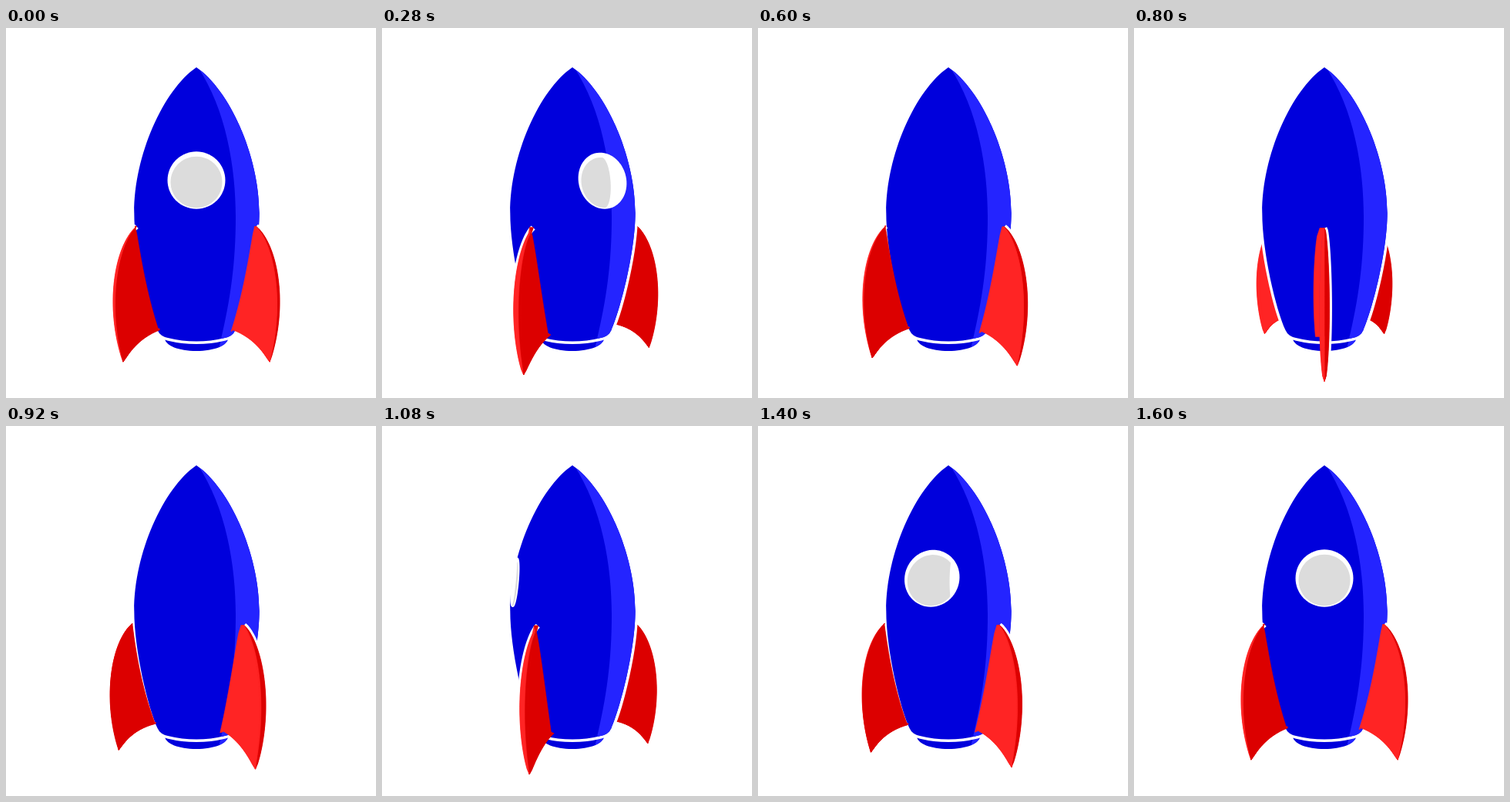
An HTML page with a canvas for the animation above (1640 ms loop, 480 px wide and 480 px high).

```html
<!DOCTYPE html>
<html lang="en">
<head>
<meta charset="utf-8">
<title>Spinning rocket</title>
<style>
  html, body { margin: 0; width: 100%; height: 100%; overflow: hidden; background: #fff; }
  canvas { display: block; }
</style>
</head>
<body>
<canvas id="stage" width="480" height="480"></canvas>
<script>
const ctx = document.getElementById('stage').getContext('2d');
const { sin, cos, PI } = Math;
const TAU = 2 * PI, RAD = PI / 180;
const LOOP = 1640, STEP = 40;
const CAMERA = 486, AXIS = 247, HORIZON = 235;
const BLUE = '#0000dc', LIGHT_BLUE = '#2424ff';
const RED = '#dc0000', LIGHT_RED = '#ff2424', GREY = '#dcdcdc';

const body = new Path2D(`M247 51 C204.5 80 166 165 166.3 240 C166.3 290 184 365 196.5 392
  Q200 400 210 402 Q247 411 284 402 Q294 400 297.5 392
  C309.5 365 328.6 290 328.6 240 C328.6 165 289.5 80 247 51 Z`);
const nozzle = new Path2D(`M206 403 Q247 410 288 403 C287 412 270 419 247 419
  C224 419 207 412 206 403 Z`);
const shine = new Path2D('M249 51 C285 105 298 180 298 245 C298 310 290 360 275 420 H400 V51 Z');

// Point at angle a, distance r from the axis, sideways offset and height h.
function project(a, r, offset, h) {
  const x = r * sin(a) + offset * cos(a);
  const z = r * cos(a) - offset * sin(a);
  const scale = CAMERA / (CAMERA - z);
  return [AXIS + x * scale, HORIZON + h * scale];
}

function bezier(points, t) {
  while (points.length > 1) {
    points = points.slice(1).map((p, i) =>
      p.map((v, k) => points[i][k] + (v - points[i][k]) * t));
  }
  return points[0];
}

const sample = (points, n) =>
  Array.from({ length: n + 1 }, (_, i) => bezier(points, i / n));

// Fin profile as [radius, height].
const TOP = [82, 20.5], TIP = [98.6, 178], BASE = [54, 147];
const outer = sample([TOP, [108, 43.5], [118.5, 112], TIP], 32);
const lower = sample([TIP, [84, 153], BASE], 12);
const root = sample([BASE, [74, 92], TOP], 16);
const thickness = h => Math.sqrt(Math.max(0, sin(PI * (h - TOP[1]) / (TIP[1] - TOP[1]))));

function trace(points) {
  ctx.beginPath();
  points.forEach(p => ctx.lineTo(...p));
}

function fillShape(points, color, outline = 0.6) {
  trace(points);
  ctx.closePath();
  ctx.fillStyle = ctx.strokeStyle = color;
  ctx.lineWidth = outline;
  ctx.fill();
  if (outline) ctx.stroke();
}

// The fin is a wedge: thin at the rim, thicker and skewed at the root.
function drawFin(a) {
  const rimSide = side => ([r, h]) => project(a, r, side * 5 * thickness(h), h);
  const rootSide = side => ([r, h]) => project(a, r, side * 7 * thickness(h) - 5, h);
  const ridge = ([r, h]) => project(a, r - thickness(h) * 2.5, 0, h);
  const farSide = a < -4 * RAD ? -1 : 1;
  const leftLit = a > -100 * RAD && a < 80 * RAD;

  trace([...outer, ...lower].map(rimSide(farSide)));
  ctx.strokeStyle = '#fff';
  ctx.lineWidth = 7;
  ctx.stroke();

  for (const side of [farSide, -farSide]) {
    const color = (side < 0) === leftLit ? LIGHT_RED : RED;
    const rim = [...outer, ...lower].map(rimSide(side));
    fillShape([...rim, ...root.map(rootSide(side))], color);
    for (const edge of [lower, outer]) {
      fillShape([...edge.map(rimSide(side)), ...edge.map(ridge).reverse()], color);
    }
  }
}

function drawBody() {
  for (const part of [nozzle, body]) {
    ctx.strokeStyle = '#fff';
    ctx.lineWidth = 7;
    ctx.stroke(part);
    ctx.save();
    ctx.clip(part);
    ctx.fillStyle = BLUE;
    ctx.fillRect(0, 0, 480, 480);
    ctx.fillStyle = LIGHT_BLUE;
    ctx.fill(shine);
    ctx.restore();
  }
}

function drawPorthole(a) {
  if (cos(a) < 0) return;
  const disc = shape => Array.from({ length: 64 }, (_, i) => {
    const [u, v] = shape(cos(i * TAU / 64), sin(i * TAU / 64));
    return project(a, 74 + 3 * v, 30.5 * u, -32 + 30.5 * v);
  });
  const bulge = a > 0 ? Math.max(-1, 1 - 2 * (a / 1.15) ** 1.3) : 1;
  fillShape(disc((u, v) => [u, v]), '#fff', 3);
  fillShape(disc((u, v) => [0.93 * u * (u > 0 ? bulge : 1), 0.93 * v + 0.07]), GREY, 0);
  if (a < 0) {
    const k = -sin(a) * 0.64;
    fillShape(disc((u, v) => [Math.min(1 - k + k * u, Math.sqrt(1 - v * v)), v]), '#fff', 0);
  }
}

const wrap = a => a - TAU * Math.round(a / TAU);
const ease = p => (p * p * (3 - 2 * p) + (1 - cos(PI * p)) / 2) / 2;

function draw() {
  const time = Math.floor(performance.now() % LOOP / STEP) * STEP;
  const turn = TAU * ease(time / (LOOP - STEP));
  const fins = [60, 180, 300].map(d => wrap(turn + d * RAD))
    .sort((a, b) => cos(a) - cos(b));
  const inFront = a => cos(a) > 0.17;

  ctx.fillStyle = '#fff';
  ctx.fillRect(0, 0, 480, 480);
  ctx.lineJoin = 'round';
  fins.filter(a => !inFront(a)).forEach(drawFin);
  drawBody();
  drawPorthole(wrap(turn));
  fins.filter(inFront).forEach(drawFin);
  requestAnimationFrame(draw);
}
draw();
</script>
</body>
</html>
```
